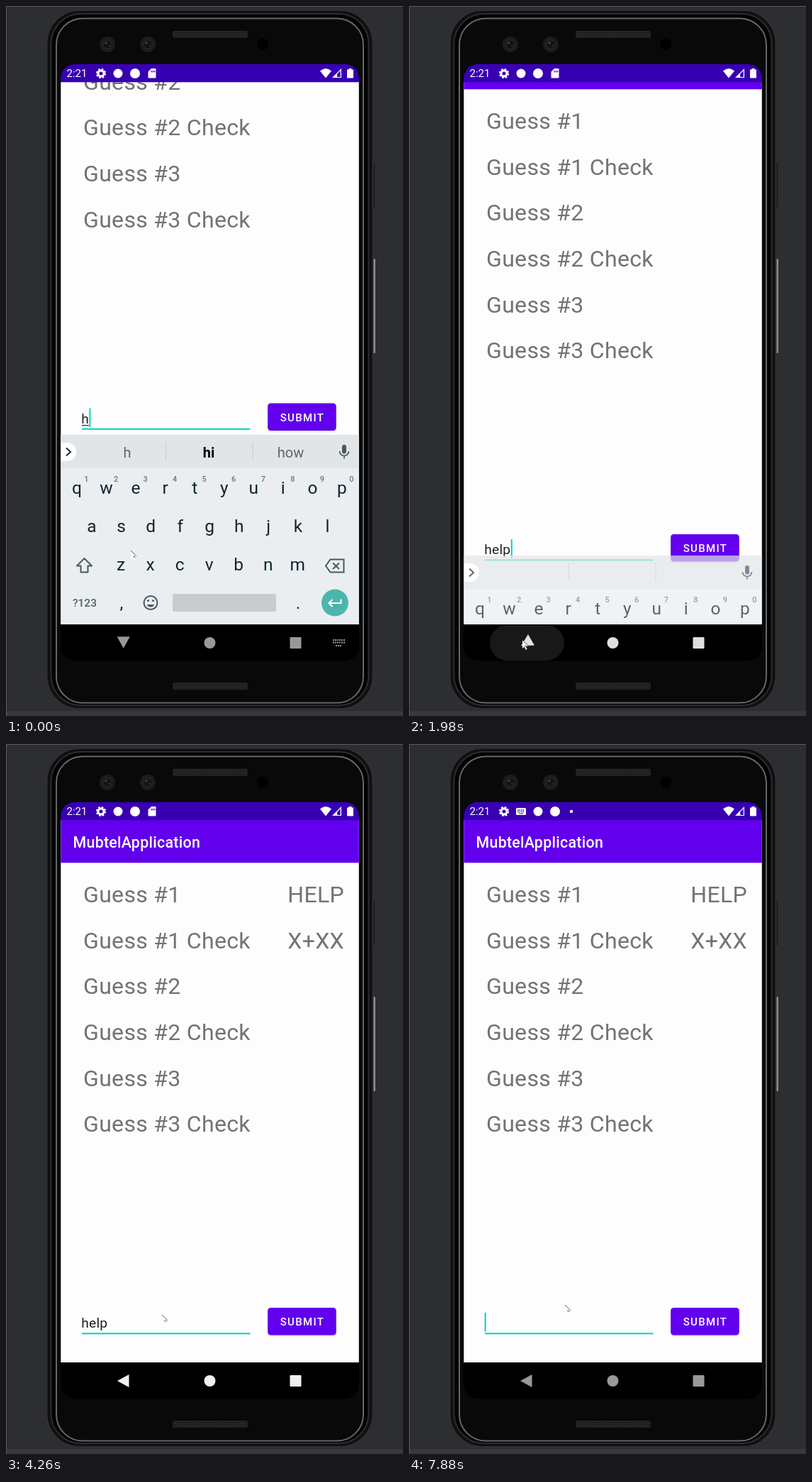
These frames come from a looping animation (560x1000 px, 8000 ms). An HTML page:

```html
<!DOCTYPE html>
<html lang="en">
<head>
<meta charset="utf-8">
<title>Word guessing app</title>
<style>
html, body { margin: 0; width: 100%; height: 100%; overflow: hidden; background: #2d2e32; }
svg { display: block; width: 100%; height: 100%; font-family: Roboto, sans-serif; }
.mid { text-anchor: middle; }
.guess { font-size: 32.1px; letter-spacing: .28px; fill: #737373; }
.key { font-size: 24.5px; text-anchor: middle; fill: #0f2630; }
.hint { font-size: 11px; font-weight: 500; text-anchor: middle; fill: #6b777d; }
.suggest { font-size: 20px; text-anchor: middle; fill: #5b676e; }
.line { fill: none; stroke: #4a5960; stroke-width: 2; }
</style>
</head>
<body>
<svg viewBox="0 0 560 1000">
  <defs>
    <clipPath id="screenClip"><rect x="77.3" y="81.7" width="420.5" height="840.6" rx="20"/></clipPath>
    <clipPath id="appClip"><rect x="77" y="107" width="421" height="764"/></clipPath>
    <pattern id="mesh" width="3" height="3" patternUnits="userSpaceOnUse">
      <rect width="3" height="3" fill="#262626"/><circle cx="1.5" cy="1.5" r=".8" fill="#111"/>
    </pattern>
    <filter id="soft" x="-20%" y="-40%" width="140%" height="190%"><feGaussianBlur stdDeviation="1.8"/></filter>
  </defs>

  <!-- Phone body -->
  <rect width="560" height="1000" fill="#2d2e32"/>
  <rect y="993" width="560" height="7" fill="#38393c"/>
  <path d="M.5 1000V.5H560" fill="none" stroke="#5c5d60"/>
  <rect x="516" y="220" width="5" height="64" rx="1.5" fill="#1b1b1c" stroke="#3c3c3e" stroke-width=".7"/>
  <rect x="517.5" y="356" width="3.5" height="133" rx="1.5" fill="#8d8d8f"/>
  <rect x="57.5" y="6" width="460" height="984" rx="46" fill="#101010" stroke="#303032" stroke-width="2"/>
  <rect x="63.5" y="11" width="448" height="974" rx="42" fill="#020202" stroke="#2c2c2d" stroke-width="2"/>
  <rect x="71" y="17.5" width="433" height="964" rx="37" fill="#090909" stroke="#676769" stroke-width="2"/>
  <rect x="235" y="35" width="106" height="10" rx="2.5" fill="url(#mesh)"/>
  <rect x="235" y="953" width="106" height="10" rx="2.5" fill="url(#mesh)"/>
  <g id="cameras"></g>
  <circle cx="362" cy="54" r="8" fill="#000"/>

  <g clip-path="url(#screenClip)">
    <rect x="77" y="81" width="421" height="842" fill="#000"/>
    <g clip-path="url(#appClip)">
      <rect x="77" y="107" width="421" height="764" fill="#fdfdfd"/>
      <g id="app">
        <rect x="77" y="107" width="421" height="60.3" fill="#6200ee"/>
        <text x="94.5" y="146" font-size="21.4" font-weight="500" letter-spacing=".27" fill="#fff">MubtelApplication</text>
        <g id="guesses"></g>
        <g id="answer" class="guess mid"><text x="437.2" y="223">HELP</text><text x="437.2" y="287.6">X+XX</text></g>
        <text id="input" x="106.2" y="822" font-size="19.2" letter-spacing=".25" fill="#1f1f1f"></text>
        <rect id="composing" x="107" y="824.6" height="1.2" fill="#222"/>
        <rect x="107" y="829.3" width="237.5" height="2.1" fill="#0dd3c2"/>
        <rect id="caret" y="801" width="2" height="26.5" fill="#03d5c3"/>
        <rect id="shadow" x="370" y="797" width="95" height="37" rx="4" filter="url(#soft)"/>
        <rect x="369.2" y="794" width="96.5" height="38.5" rx="4.2" fill="#6200ee"/>
        <rect id="press" x="369.2" y="794" width="96.5" height="38.5" rx="4.2" fill="#fff"/>
        <text x="418" y="819" class="mid" font-size="15" font-weight="500" letter-spacing="1.34" fill="#fff">SUBMIT</text>
      </g>
      <g id="keyboard">
        <rect x="77" y="604" width="421" height="267" fill="#eaeef1"/>
        <rect x="77" y="604" width="421" height="47" fill="#e1e5e8"/>
        <path d="M77 615h9a13 13 0 0 1 0 26h-9z" fill="#fff"/>
        <path d="M85 622.5l6 5.5-6 5.5" class="line" style="stroke:#1c2b32"/>
        <path d="M225.5 614v26M348 614v26" stroke="#c6cbcf"/>
        <g id="suggestions"><text class="suggest" x="171" y="636"></text><text class="suggest" x="286" y="636" style="font-weight:700;fill:#000"></text><text class="suggest" x="401.5" y="636"></text></g>
        <rect x="474" y="618" width="6" height="12.5" rx="3" fill="#4a5960"/>
        <path d="M470.5 627a6.5 6.5 0 0 0 13 0M477 633.5v4" class="line" style="stroke-width:1.7"/>
        <g id="keys"></g>
        <path d="M110.5 778l10.5 10.5h-5.5v9h-10v-9h-5.5z" class="line" stroke-linejoin="round"/>
        <path d="M457.5 779.5h19v18h-19l-6.5-9zM461 784.5l9 8.5m0-8.5l-9 8.5" class="line"/>
        <text x="111" y="846" class="mid" font-size="15.5" font-weight="500" fill="#526067">?123</text>
        <circle cx="204" cy="840.5" r="9.5" class="line"/>
        <path d="M198.800 843a5.6 5.6 0 0 0 10.4 0z" fill="#4a5960"/>
        <circle cx="200.5" cy="837.5" r="1.5" fill="#4a5960"/><circle cx="207.5" cy="837.5" r="1.5" fill="#4a5960"/>
        <rect x="235" y="828" width="146" height="25" rx="2" fill="#c7ccd0"/>
        <circle cx="464" cy="840.5" r="19" fill="#4db6ac"/>
        <path d="M472.5 835.5v5.5h-17m5-5l-5 5 5 5" class="line" style="stroke:#fff"/>
      </g>
    </g>

    <!-- Status bar -->
    <rect x="77" y="81" width="421" height="26.3" fill="#3700b3"/>
    <text x="85.5" y="100.3" font-size="15" fill="#fff">2:21</text>
    <g fill="#fff">
      <g fill="none" stroke="#fff"><circle cx="134" cy="95" r="4" stroke-width="3"/><circle cx="134" cy="95" r="6" stroke-width="2.2" stroke-dasharray="2.7 2.012"/></g>
      <g id="statusKeyboard"><rect x="151" y="90" width="14" height="10" rx="1.5"/><path d="M153 93h10M153 95.5h10" stroke="#3700b3" stroke-width="1.3" stroke-dasharray="1.5 1"/><path d="M155 98h6" stroke="#3700b3"/></g>
      <circle id="badgeA" cy="95" r="6.5"/>
      <circle id="badgeB" cy="95" r="7"/>
      <path id="card" fill-rule="evenodd" d="M205 88h5.5q1 0 1 1v11.5q0 1-1 1h-9q-1 0-1-1v-8zM204.5 91v2.5h1.2v-2.5zM206.8 91v2.5h1.2v-2.5zM209 91v2.5h1.2v-2.5z"/>
      <circle id="dot" cx="229" cy="95" r="2.2"/>
      <path d="M443 91.5q8-7 16 0l-8 10z"/>
      <path d="M473 88v13h-13zm-1.3 3l-4.5 4.7v4.2h4.5z" fill-rule="evenodd"/>
      <path d="M483.5 89.5v-1.5h4v1.5h2q.5 0 .5.7v10.5q0 .8-.8.8h-7.4q-.8 0-.8-.8v-10.5q0-.7.5-.7z"/>
    </g>

    <!-- Navigation bar -->
    <rect id="navRipple" y="872" height="50" rx="25" fill="#fff"/>
    <g id="nav" fill="#fff">
      <path id="back" d="M157 897l16.5-9v18z"/>
      <circle cx="287.5" cy="897" r="8"/>
      <rect x="400.5" y="889" width="16" height="16" rx="1"/>
      <path id="imeKey" d="M461 893h17M461 896.5h17M465 901h9" stroke="#fff" stroke-width="1.9" stroke-dasharray="2 1"/>
    </g>
  </g>

  <g id="pointer">
    <path d="M0 0v12l2.7-2.5 2 4.3 1.9-.9-2-4.2 3.9-.3z" fill="#fff"/>
    <path d="M0 0l8 8M3 9l2-1.2 1 2.2" fill="none" stroke="#333" stroke-width=".8"/>
  </g>
</svg>
<script>
const LOOP = 8000;
const $ = id => document.getElementById(id);
const set = (id, attrs) => { for (const k in attrs) $(id).setAttribute(k, attrs[k]); };
const text = (cls, x, y, s) => `<text class="${cls}" x="${x}" y="${y}">${s}</text>`;

$("cameras").innerHTML = [143, 200].map(x =>
  `<circle cx="${x}" cy="54" r="11" fill="#1b1c1e"/><circle cx="${x}" cy="54" r="6" fill="#101114" stroke="#2c2e32"/>
   <circle cx="${x - 2}" cy="52" r="1.8" fill="#3c4046"/><circle cx="${x + 2.5}" cy="56" r="1.3" fill="#33363b"/>`).join("");

$("guesses").innerHTML = [0, 1, 2, 3, 4, 5].map(i =>
  text("guess", 109, 223 + i * 64.65, `Guess #${1 + (i >> 1)}${i % 2 ? " Check" : ""}`)).join("");

const keyRow = (letters, x, y) => [...letters].map((c, i) => text("key", x + i * 41.55, y, c)).join("");
$("keys").innerHTML = keyRow("qwertyuiop", 100, 687) + keyRow("asdfghjkl", 121, 741) +
  keyRow("zxcvbnm", 162, 795) + text("key", 163, 849, ",") + text("key", 412, 849, ".") +
  [..."1234567890"].map((c, i) => text("hint", 113.5 + i * 41.55, 670, c)).join("");

const refreshes = [0, 150, 270, 830, 1290, 1420, 1550, 1690, 1830, 1980, 2100, 2230, 2370, 2500, 2640, 2890,
  3170, 3320, 3440, 3590, 3840, 3980, 4110, 4260, 4380, 4500, 4620, 4740, 4880, 5160, 5710,
  6150, 6460, 6580, 6830, 7360, 7620, 7750, 7880];
const caretToggles = [830, 1290, 2370, 2890, 3320, 3840, 4260, 4740, 5160, 5710, 7360, 7880];
const typing = [[0, "h"], [150, "hel"], [270, "help"], [6150, "hel"], [6460, "he"], [6580, "h"], [6830, ""]];
const suggested = [[0, "h hi how"], [150, "hel help hello"], [270, "hello help held"], [1690, "  "]];
const pointerPath = [[0, 176, 767], [1290, 176, 767], [1690, 160, 893], [1980, 160, 893], [2100, 165, 891],
  [2230, 190, 936], [2640, 430, 815], [2890, 430, 815], [3170, 395, 798], [3440, 395, 798],
  [4110, 224, 808], [4260, 220, 804], [4380, 220, 790]];

const latest = (list, t) => list.filter(e => e[0] <= t).pop()[1];

// Linear interpolation through [time, value] points, held at both ends.
function track(t, points, column = 1) {
  const next = points.findIndex(p => p[0] > t);
  if (next === 0) return points[0][column];
  if (next < 0) return points[points.length - 1][column];
  const a = points[next - 1], b = points[next];
  return a[column] + (b[column] - a[column]) * (t - a[0]) / (b[0] - a[0]);
}

function draw(time) {
  const t = refreshes.filter(r => r <= time).pop();

  $("input").textContent = latest(typing, t);
  const width = $("input").textContent ? $("input").getComputedTextLength() : 0;
  set("caret", { x: 106.6 + width, opacity: caretToggles.filter(c => c <= t).length % 2 ? 0 : 1 });
  set("composing", { width: Math.max(0, width - 1), opacity: t < 1690 ? 1 : 0 });

  const words = latest(suggested, t).split(" ");
  [...$("suggestions").children].forEach((node, i) => node.textContent = words[i]);

  const pan = track(t, [[1830, -234.5], [1980, -50], [2100, -1], [2230, 0]]);
  set("app", { transform: `translate(0 ${pan})` });
  set("keyboard", {
    transform: `translate(0 ${track(t, [[1830, 0], [1980, 170], [2100, 270]])})`,
    opacity: track(t, [[1830, 1], [1980, .7], [2100, 0]])
  });

  const press = track(t, [[3170, 0], [3320, .43], [3590, 0]]);
  set("press", { opacity: press });
  set("shadow", { opacity: .3 + press * .3, transform: `translate(0 ${press * 5 - 1})` });
  set("answer", { opacity: t >= 3320 ? 1 : 0 });

  const turn = track(t, [[1830, -90], [1980, -30], [2100, 0]]);
  set("back", { transform: `translate(0 ${turn / 90}) rotate(${turn} 165.7 897)` });
  set("nav", { opacity: track(t, [[1690, .6], [1830, .73], [2100, 1], [4110, 1], [4260, .94], [4880, .6]]) });
  set("imeKey", { opacity: t < 1980 ? 1 : 0 });
  const ripple = track(t, [[1690, 84], [1830, 100], [2100, 109]]);
  set("navRipple", {
    x: 166.3 - ripple / 2, width: ripple,
    opacity: track(t, [[1550, 0], [1690, .08], [1830, .13], [2100, .065], [2230, 0]])
  });

  const shift = track(t, [[7360, 0], [7750, 1]]);
  set("statusKeyboard", { opacity: shift });
  set("badgeA", { cx: 158 + 24 * shift });
  set("badgeB", { cx: 182 + 24 * shift });
  set("card", { opacity: 1 - shift });
  set("dot", { opacity: shift });

  set("pointer", { transform: `translate(${track(t, pointerPath)} ${track(t, pointerPath, 2)})` });
}

const start = performance.now();
function frame() {
  draw((performance.now() - start) % LOOP);
  requestAnimationFrame(frame);
}
frame();
</script>
</body>
</html>
```
